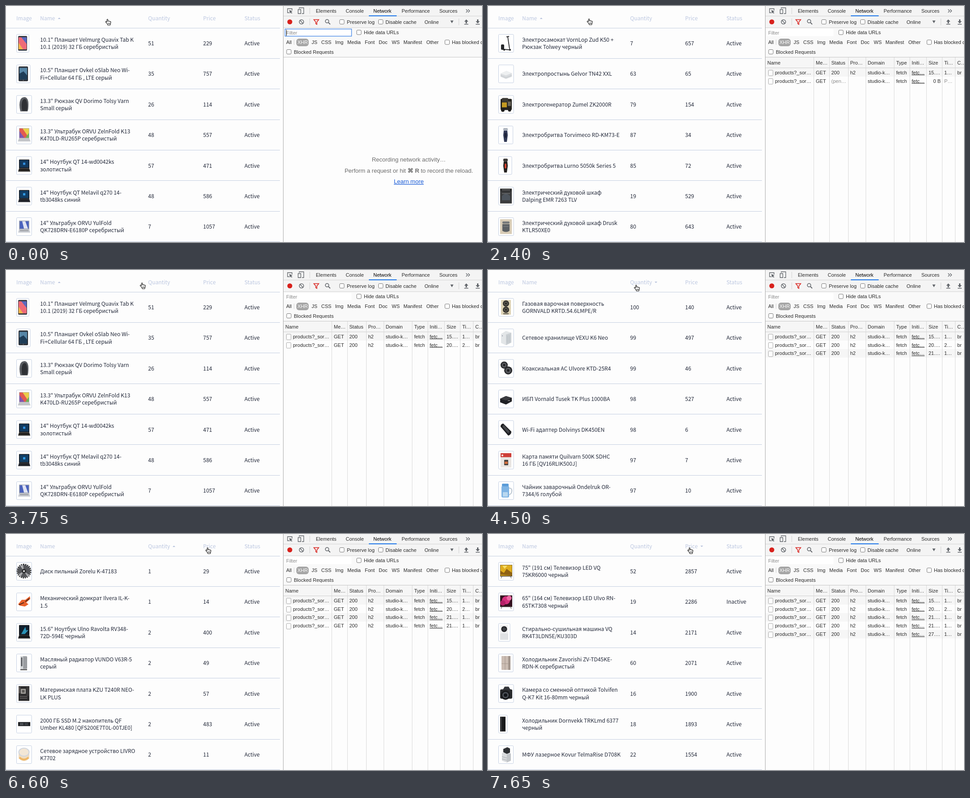
An HTML page that plays this animation: 1060x528 px, repeating every 8000 ms.

```html
<!DOCTYPE html>
<html lang="ru">
<head>
<meta charset="utf-8">
<title>Sortable product table</title>
<style>
  html, body { margin: 0; width: 100%; height: 100%; overflow: hidden; background: #fdfdfd; }
  svg { display: block; }
  .shop { font: 12px "Noto Sans CJK SC", "Noto Sans CJK JP", "Noto Sans CJK", "Noto Sans", sans-serif; fill: #222839; }
  .head { fill: #bcc7e0; }
  .tools { font: 11px "Liberation Sans", Arial, sans-serif; fill: #2b2b2b; }
  .empty { font-size: 13px; fill: #6b6b6b; text-anchor: middle; }
  .dim { fill: #8a8a8a; }
</style>
</head>
<body>
<svg width="1060" height="528" viewBox="0 0 1060 528">
  <g class="shop">
    <g id="grid"></g>
    <path id="sort" fill="#b3bfda"/>
    <g id="rows"></g>
  </g>
  <g class="tools">
    <g id="panel"></g>
    <g id="filter"></g>
    <g id="log"></g>
  </g>
  <g id="hand" stroke="#111" stroke-width="1.1" stroke-linejoin="round" fill="#fff">
    <path d="M3.3 9.6L1 7.3C.2 6.2 1.5 5 2.6 5.9L3.8 7V2C3.8.4 6 .4 6 2V5.2C6.8 4.6 8 4.8 8.2 5.6C9 5 10.2 5.3 10.3 6.1C11.4 5.6 12.5 6.2 12.4 7.3C12.2 10 11.6 11 11 14H5.5C5.2 12.3 4.3 11 3.3 9.6Z"/>
    <path d="M6.5 9v3M8.3 9v3M10 9v3" stroke-width=".8"/>
  </g>
</svg>
<script>
const LOOP = 8000;
const byId = id => document.getElementById(id);

const rect = (x, y, w, h, fill, r = 0, extra = '') =>
  `<rect x="${x}" y="${y}" width="${w}" height="${h}" fill="${fill}" rx="${r}" ${extra}/>`;
const shape = (d, fill) => `<path d="${d}" fill="${fill}"/>`;
const line = (d, color, width = 1, extra = '') =>
  `<path d="${d}" fill="none" stroke="${color}" stroke-width="${width}" ${extra}/>`;
const dot = (x, y, r, fill) => `<circle cx="${x}" cy="${y}" r="${r}" fill="${fill}"/>`;
const text = (x, y, s, extra = '') => `<text x="${x}" y="${y}" ${extra}>${s}</text>`;

// Thumbnails, drawn in a box 34 wide and 41 high
const laptop = (frame, screen, base, detail = '', top = 7) =>
  rect(6, top, 23, 27 - top, frame, 1) + rect(7.5, top + 1.5, 20, 23.5 - top, screen) + detail +
  shape('M6 27h23l2 7h-27z', base) + line('M8 29.5h19', '#0005', 1.5);
const shaver = (body, accent, head) =>
  rect(11, 5, 10, 6, head, 2) + shape('M12 11h8l1 10-2 15h-6l-2-15z', body) +
  rect(14, 16, 4, 11, accent, 2);
const television = (picture, detail) =>
  rect(4, 6, 27, 26, '#3a3230') + rect(4.5, 6.5, 26, 24, picture) + detail +
  line('M8 32l-2 4M27 32l2 4', '#666', 1.2);
const speaker = (x, y, r) =>
  dot(x, y, r, '#26272a') + dot(x, y, r * .7, '#54565a') + dot(x, y, r * .3, '#1c1d20');
const burner = y => dot(17, y, 7, '#34322e') + dot(17, y, 4, '#5e5b52') + dot(17, y, 2, '#1e1d1b');

const thumbs = {
  tablet: rect(4, 4, 20, 33, '#3a3d45', 2) + rect(5, 7, 18, 27, '#ee6a78') +
    shape('M5 34V19l10 15z', '#f4b64c') + shape('M23 7v15L11 7z', '#5866bd'),
  slate: rect(5, 4, 21, 33, '#2b2f36', 2) + rect(7, 7, 17, 26, '#5786a6') +
    shape('M7 33V20l9-5 8 9v9z', '#1f3d57') + dot(15.5, 35, 1, '#777'),
  pack: shape('M9 36Q5 20 9 10Q12 4 19 4Q27 6 27 20Q27 32 25 36z', '#5a5d62') +
    shape('M13 35Q10 20 14 11Q18 6 22 10Q26 20 24 35z', '#2f3135'),
  bright: rect(6, 5, 23, 23, '#b9bbc0', 1) + rect(7, 6, 21, 21, '#e25b50') +
    shape('M7 27V12l11 15z', '#8156b0') + shape('M28 6v21L14 6z', '#e9ce4b') +
    shape('M28 16v11h-8z', '#6fb356') + shape('M6 28h23l2.5 7h-28z', '#c3c5c9'),
  gold: laptop('#1b1c20', '#12395e', '#2a2825', rect(15, 14, 5, 5, '#2f8fe0')),
  blue: laptop('#15171b', '#123f66', '#24272e', rect(15, 14, 5, 5, '#2f9be6')),
  silver: laptop('#a9adb7', '#4a62bd', '#c9ccd2', shape('M13 8.5h7l6 16.5h-9z', '#dfe3f2')),
  scooter: line('M18 6l6-1M21 6l4 27M12 34l13 1', '#2c2d30', 1.8) + dot(13, 35, 2, '#222') +
    dot(26, 35, 2, '#222') + rect(6, 23, 7, 12, '#26282b', 2),
  sheet: shape('M5 20L18 14l12 5v8l-13 5-12-5z', '#d9dcdf') + shape('M5 20L18 14l12 5-13 5z', '#eef0f1') +
    line('M5 24l12 5 13-5', '#c1c5c9'),
  generator: rect(5, 8, 25, 25, '#25241f', 2) + rect(8, 6, 14, 9, '#3b3a36', 2) + rect(8, 16, 11, 11, '#c39a22') +
    rect(21, 14, 7, 10, '#6b675b') + dot(10, 33, 4, '#1c1c1c') + dot(25, 33, 3.5, '#1c1c1c'),
  navy: shaver('#323a56', '#1d2236', '#aeb4be'),
  red: shaver('#23211f', '#d24330', '#3a3836'),
  oven: rect(4, 4, 26, 33, '#3b3c3d') + rect(4, 4, 26, 6, '#2a2b2c') + rect(8, 6, 18, 1.5, '#77787a') +
    shape('M8 30V20Q17 11 26 20V30z', '#4d545c') + line('M8 15h18', '#86888b'),
  stove: rect(4, 4, 26, 33, '#d8ccb6') + rect(9, 9, 16, 5, '#777a7b', 2) +
    shape('M9 15h16v15q-8 5-16 0z', '#5b6064') + line('M11 20h12', '#8a8e90'),
  hob: rect(6, 4, 22, 33, '#ddd2b4', 1) + burner(12) + burner(26) + line('M11 35h12', '#5a564c', 2),
  storage: shape('M6 12L17 5l12 4v22l-12 6-11-5z', '#e3e6e8') + shape('M17 13l12-4v22l-12 6z', '#cbd0d4') +
    line('M20 15v17M24 14v17', '#b2b8bd') + dot(9, 16, 1, '#889'),
  speakers: speaker(13, 13, 8) + speaker(22, 25, 9),
  power: shape('M4 20l13-6 13 4v8l-13 7-13-5z', '#202124') + shape('M4 20l13-6 13 4-13 6z', '#3b3c40') +
    rect(21, 23, 5, 2, '#777'),
  stick: shape('M5 14q0-6 6-7l18 18q0 7-7 9z', '#1f2023') + shape('M9 14l3-4 13 15-3 4z', '#44464a'),
  card: rect(5, 5, 24, 32, '#e9e6e3') + rect(5, 5, 24, 9, '#ce3d37') + dot(9, 10, 2, '#fff') +
    rect(13, 20, 9, 12, '#46413f', 1) + rect(14, 24, 7, 5, '#d5703f'),
  jug: line('M24 15q7 0 6 7t-7 8', '#b8c4cf', 2) + rect(7, 10, 17, 26, '#7fb4e4', 3) +
    rect(8, 5, 15, 6, '#5b9cd8', 2) + rect(10, 24, 11, 10, '#b9d8f0', 1),
  saw: dot(17, 20, 14, '#55565a') + line('M17 5a15 15 0 1 0 .1 0', '#2e2f32', 3, 'stroke-dasharray="2.6 1.8"') +
    shape('M17 20L8 8l7-2zM17 20l12 9-4 4zM17 20l-12 7 4 6z', '#a9aaad') +
    dot(17, 20, 5, '#2e2f31') + dot(17, 20, 2, '#eee'),
  jack: shape('M4 26l8-10 8 0 10-8 1 6-9 8 5 4-8 5-11-2z', '#e8602a') +
    line('M6 27l11-5M20 20l9-7', '#55291a', 2),
  dark: laptop('#141518', '#10202e', '#1c1d20', shape('M11 24l9-16 2 8 5-1-8 9z', '#2b93b8'), 4),
  heater: rect(10, 5, 14, 29, '#aeb1b4', 2) + line('M17 7v26M20 7v26M23 7v26', '#74777b') +
    rect(9, 5, 6, 29, '#d5d7d9', 1) + rect(10.5, 8, 3, 20, '#55585c', 1) + line('M9 35.5h15', '#333', 2),
  board: rect(5, 4, 24, 33, '#2b2a2b') + rect(10, 10, 11, 11, '#a5a29e') + rect(12.5, 12.5, 6, 6, '#5c5956') +
    line('M24 6v20M27 6v20', '#4d4a4a', 1.4) + line('M8 27h16M8 31h16', '#777270', 1.4) + rect(5, 6, 4, 14, '#5a5553'),
  drive: rect(4, 16, 27, 9, '#1f2124') + rect(8, 18, 8, 5, '#4c5055') + rect(18, 18, 8, 5, '#3a3e43'),
  charger: shape('M5 16v13q12 12 24 0V16z', '#f0dcc0') + `<ellipse cx="17" cy="15" rx="12.5" ry="10" fill="#cfd6e0"/>` +
    `<ellipse cx="17" cy="15" rx="10.5" ry="8" fill="#f3e7d6"/>` + line('M7 27q10 9 20 0', '#efb765', 4),
  yellow: television('#e0ae1f', shape('M4.5 28V19l8 5 6-9 12 9v6z', '#8f6214') + shape('M9 8h11l-6 7z', '#f6de6a')),
  pink: television('#35101f', dot(17, 17, 9, '#d42f7c') + dot(10, 23, 6, '#b32066') + dot(24, 12, 5.5, '#ee6aa4')),
  washer: rect(4, 4, 18, 33, '#eeeff0', 1) + rect(4, 23, 18, 14, '#dfe1e3') + dot(13, 13, 6.5, '#1e1f22') + dot(13, 13, 4, '#3c3e43'),
  fridge: rect(7, 5, 20, 31, '#cbbdb3', 1) + rect(22, 5, 5, 31, '#a3968d') + line('M15 5v31M7 22h20', '#9c8f87', .8),
  camera: rect(4, 11, 27, 21, '#2a2b2e', 3) + shape('M10 12l4-7h9l4 7z', '#34363a') + dot(16, 24, 10.5, '#191a1c') +
    dot(16, 24, 7, '#4c5057') + dot(16, 24, 4, '#14161a'),
  tall: rect(4, 4, 12, 33, '#18191b') + rect(5, 5, 3, 31, '#35373a'),
  printer: shape('M8 17l12-3 8 4v16l-9 4-11-4z', '#d9dbdd') + shape('M19 20l9-2v16l-9 4z', '#c2c5c8') +
    shape('M11 8l9-4 6 3v9l-7 3-8-4z', '#2e3033') + line('M8 25l11 3M8 30l11 3', '#a4a7aa')
};

// name (| breaks the line), quantity, price, thumbnail, frame width, status
const lists = {
  nameUp: [
    ['10.1" Планшет Velmurg Quavix Tab K|10.1 (2019) 32 ГБ серебристый', 51, 229, 'tablet', 28],
    ['10.5" Планшет Ovkel oSlab Neo Wi-|Fi+Cellular 64 ГБ , LTE серый', 35, 757, 'slate', 31],
    ['13.3" Рюкзак QV Dorimo Tolsy Varn|Small серый', 26, 114, 'pack'],
    ['13.3" Ультрабук ORVU ZelnFold K13|K470LD-RU265P серебристый', 48, 557, 'bright'],
    ['14" Ноутбук QT 14-wd0042ks|золотистый', 57, 471, 'gold'],
    ['14" Ноутбук QT Melavil q270 14-|tb3048ks синий', 48, 586, 'blue'],
    ['14" Ультрабук ORVU YulFold|QK728DRN-E6180P серебристый', 7, 1057, 'silver']
  ],
  nameDown: [
    ['Электросамокат VornLop Zud K50 +|Рюкзак Tolwey черный', 7, 657, 'scooter'],
    ['Электропростынь Gelvor TN42 XXL', 63, 65, 'sheet'],
    ['Электрогенератор Zumel ZK2000R', 79, 154, 'generator'],
    ['Электробритва Torvimeco RD-KM73-E', 87, 34, 'navy', 32.5],
    ['Электробритва Lurno 5050k Series 5', 85, 72, 'red', 30],
    ['Электрический духовой шкаф|Dalping EMR 7263 TLV', 19, 529, 'oven'],
    ['Электрический духовой шкаф Drusk|KTLR50XE0', 80, 643, 'stove']
  ],
  quantityDown: [
    ['Газовая варочная поверхность|GORNVALD KRTD.54.6LMPE/R', 100, 140, 'hob'],
    ['Сетевое хранилище VEXU K6 Neo', 99, 497, 'storage'],
    ['Коаксиальная АС Ulvore KTD-25R4', 99, 46, 'speakers'],
    ['ИБП Vornald Tusek TK Plus 1000ВА', 98, 527, 'power'],
    ['Wi-Fi адаптер Dolvinys DK450EN', 98, 6, 'stick'],
    ['Карта памяти Quilvarn 500K SDHC|16 ГБ [QV16RLIK500J]', 97, 7, 'card'],
    ['Чайник заварочный Ondelruk OR-|7344/6 голубой', 97, 10, 'jug']
  ],
  quantityUp: [
    ['Диск пильный Zorelu K-47183', 1, 29, 'saw'],
    ['Механический домкрат Ilvera IL-K-|1.5', 1, 14, 'jack'],
    ['15.6" Ноутбук Ulno Ravolta RV348-|72D-594E черный', 2, 400, 'dark'],
    ['Масляный радиатор VUNDO V63R-5|серый', 2, 49, 'heater'],
    ['Материнская плата KZU T240R NEO-|LK PLUS', 2, 57, 'board'],
    ['2000 ГБ SSD M.2 накопитель QF|Umber KL480 [QFS200E7T0L-00TJE0]', 2, 483, 'drive'],
    ['Сетевое зарядное устройство LIVRO|K7702', 2, 11, 'charger']
  ],
  priceDown: [
    ['75" (191 см) Телевизор LED VQ|75KR6000 черный', 52, 2857, 'yellow'],
    ['65" (164 см) Телевизор LED Ulvo RN-|65TK7308 черный', 19, 2286, 'pink', 34, 'Inactive'],
    ['Стирально-сушильная машина VQ|RK4T3LDN5E/KU303D', 14, 2171, 'washer', 26],
    ['Холодильник Zavorishi ZV-TD45KE-|RDN-K серебристый', 60, 2071, 'fridge', 33],
    ['Камера со сменной оптикой Tolvifen|Q-K7 Kit 16-80mm черный', 16, 1900, 'camera'],
    ['Холодильник Dornvekk TRKLmd 6377|черный', 18, 1893, 'tall', 20],
    ['МФУ лазерное Kovur TelmaRise D708K', 22, 1554, 'printer', 33.5]
  ]
};

// Timelines: [start in ms, ...values]
const listTrack = [[0, 'nameUp'], [600, 'nameDown'], [2700, 'nameUp'], [4500, 'quantityDown'], [5700, 'quantityUp'], [7500, 'priceDown']];
const sortTrack = [[0, 118.5, 1], [450, 118.5, -1], [2400, 118.5, 1], [4350, 374, -1], [5550, 374, 1], [7200, 476, -1]];
const filterTrack = [[0, true, true], [300, true, false], [450, false, false]];
const logTrack = [[0, 0], [450, 1, true], [600, 1], [2400, 2, true], [2550, 2], [4350, 3], [5550, 4], [7200, 5, true], [7350, 5]];
const handTrack = [[0, 221, 28.7], [150, 220, 28], [3750, 298, 28], [3900, 323, 34.5], [4050, 325, 33], [6000, 394, 34],
  [6150, 426, 34], [6300, 438, 32], [6450, 444.5, 31.5], [6600, 444, 30]];

function drawGrid() {
  const head = [[23, 'Image'], [76, 'Name'], [316.5, 'Quantity'], [439, 'Price'], [531, 'Status']];
  let out = `<g class="head">${head.map(([x, s]) => text(x, 32.4, s)).join('')}</g>`;
  for (let i = 0; i < 8; i++) out += rect(0, Math.round(48.6 + 68.35 * i), 610, 1, '#c3cde0');
  byId('grid').innerHTML = out;
}

function drawRow([name, quantity, price, thumb, width = 34, status = 'Active'], i) {
  const mid = 83.5 + 68.35 * i, base = mid + 4.6;
  const lines = name.split('|');
  return `<g transform="translate(23 ${mid - 20.5})">` +
    rect(.5, .5, width - .5, 40, '#fff', 2, 'stroke="#c5d0e3"') + thumbs[thumb] + '</g>' +
    lines.map((s, k) => text(76, base + (k - (lines.length - 1) / 2) * 16.3, s)).join('') +
    text(316.5, base, quantity) + text(439, base, price) + text(531, base, status);
}

function drawPanel() {
  const gray = '#5f6368';
  const labels = (y, list) => list.map(([x, s]) => text(x, y, s)).join('');
  const check = (x, y) => rect(x + .5, y + .5, 10, 10, '#fff', 2, 'stroke="#767676"');
  byId('panel').innerHTML =
    rect(617, 0, 443, 528, '#fdfdfd') + rect(617, 0, 443, 48, '#f4f4f4') + rect(617, 48, 443, 66, '#f9f9f9') +
    line('M617 22.5h443M617 48.5h443', '#d4d4d4') + line('M617 114.5h443', '#c4c4c4') +
    line('M676.5 4v14M676.5 28v15M1008.5 28v15M641.5 75v12', '#d2d2d2') +
    line('M631 15h-4V6h10v4', gray, 1.3) + shape('M631 9l7 3-3 1.3 2.5 2.5-1.2 1.2-2.5-2.5-1.4 2.5z', gray) +
    line('M653 6V4h10v13h-4M650.5 8h6v9h-6z', gray, 1.3) +
    labels(15, [[690, 'Elements'], [756.5, 'Console'], [881, 'Performance'], [965, 'Sources']]) +
    text(818, 15, 'Network', 'fill="#000"') + rect(808, 21, 62, 2, '#1a73e8') +
    line('M1024.5 7.5l3.5 3.5-3.5 3.5M1029 7.5l3.5 3.5-3.5 3.5', gray, 1.4) +
    dot(632, 35.5, 5.5, '#d8211c') +
    `<circle cx="658" cy="35.5" r="4.8" fill="none" stroke="${gray}" stroke-width="1.5"/>` + line('M654.5 32l7 7', gray, 1.5) +
    line('M685.5 30.5h11l-4.2 5.2v5.5l-2.6-1.6v-3.9z', '#d8211c', 1.5) +
    `<circle cx="715" cy="34" r="3.8" fill="none" stroke="${gray}" stroke-width="1.5"/>` + line('M718 37l4 4', gray, 1.8) +
    check(742.5, 30) + check(829, 30) +
    labels(39.5, [[759, 'Preserve log'], [845, 'Disable cache'], [932, 'Online']]) +
    shape('M989.5 32.5h7l-3.5 6z', gray) +
    shape('M1025 30l4.5 5h-3v4h-3v-4h-3zM1020.5 40h9v1.4h-9zM1049 30h3v4h3l-4.5 5-4.5-5h3zM1046 40h9v1.4h-9z', gray) +
    check(780.5, 53.5) + text(797, 63.3, 'Hide data URLs') +
    rect(646.5, 73, 27.5, 17, '#a5a5a5', 6) + text(649, 85, 'XHR', 'fill="#fff"') +
    labels(85, [[624, 'All'], [680.5, 'JS'], [702, 'CSS'], [733, 'Img'], [760, 'Media'], [799, 'Font'], [830, 'Doc'],
      [859, 'WS'], [885, 'Manifest'], [936, 'Other'], [993, 'Has blocked cookies']]) +
    check(977, 75.5) + check(624.5, 97) + text(641, 106.5, 'Blocked Requests') +
    rect(617, 0, 1, 528, '#a9a9a9');
}

function drawFilter([, focused, caret]) {
  byId('filter').innerHTML =
    rect(621.5, 51.5, 148, 16, '#fff', 0, focused ? 'stroke="#4a8ae8" stroke-width="1.4"' : '') +
    text(624, 64, 'Filter', 'fill="#8a8a8a"') + (caret ? rect(624, 53, 1, 14, '#222') : '');
}

const columns = [[622, 'Name'], [730, 'Me…'], [764.5, 'Status'], [806.5, 'Pro…'], [845.5, 'Domain'],
  [909, 'Type'], [943.5, 'Initi…'], [981, 'Size'], [1016, 'Ti…'], [1045, 'C…']];
const sizes = ['15.…', '20.…', '21.…', '21.…', '27.…'];

function drawRequest(i, pending) {
  const y = 152.6 + 18.9 * i;
  const cells = ['GET', pending ? '(pen…' : '200', pending ? '' : 'h2', 'studio-k…', 'fetch', 'fetc…',
    pending ? '' : sizes[i], pending ? 'P…' : i === 1 ? '2…' : '1…', pending ? '' : 'br'];
  const style = k => k === 5 ? 'text-decoration="underline"' : pending && (k === 1 || k === 7) ? 'class="dim"' : '';
  return (i % 2 ? '' : rect(618, y - 13.6, 442, 18.9, '#f6f6f6')) +
    rect(624.5, y - 9.1, 10, 12.5, '#fff', 1.5, 'stroke="#a8a8a8"') + text(639, y, 'products?_sor…') +
    cells.map((s, k) => text(columns[k + 1][0], y, s, style(k))).join('') +
    (pending ? text(1008, y, '0 B', 'text-anchor="end"') : '');
}

function drawLog([, count, pending]) {
  if (!count) {
    byId('log').innerHTML = '<g class="empty">' + text(897, 347.7, 'Recording network activity…') +
      text(897, 372.5, 'Perform a request or hit <tspan font-weight="bold">⌘ R</tspan> to record the reload.') +
      text(897, 397.3, 'Learn more', 'fill="#1558d6" text-decoration="underline"') + '</g>';
    return;
  }
  let out = rect(618, 115, 442, 23, '#f6f6f6') + rect(618, 138, 442, 1, '#cfcfcf') +
    columns.map(([x, s]) => text(x, 130.6, s)).join('');
  for (let i = 0; i < count; i++) out += drawRequest(i, pending && i === count - 1);
  for (const [x] of columns.slice(1)) out += rect(Math.round(x - 4.6), 115, 1, 413, '#d9d9d9');
  byId('log').innerHTML = out;
}

const players = [
  [listTrack, ([, key]) => byId('rows').innerHTML = lists[key].map(drawRow).join('')],
  [sortTrack, ([, x, up]) => byId('sort').setAttribute('d', `M${x - 3} ${27.5 + 1.5 * up}h6l-3 ${-3 * up}z`)],
  [filterTrack, drawFilter],
  [logTrack, drawLog],
  [handTrack, ([, x, y]) => byId('hand').setAttribute('transform', `translate(${x} ${y})`)]
].map(([track, draw]) => ({ track, draw, current: null }));

function render(time) {
  for (const player of players) {
    const step = player.track.findLast(([start]) => start <= time);
    if (step !== player.current) player.draw(player.current = step);
  }
}

const began = performance.now();
function tick() {
  render((performance.now() - began) % LOOP);
  requestAnimationFrame(tick);
}

drawGrid();
drawPanel();
tick();
</script>
</body>
</html>
```
